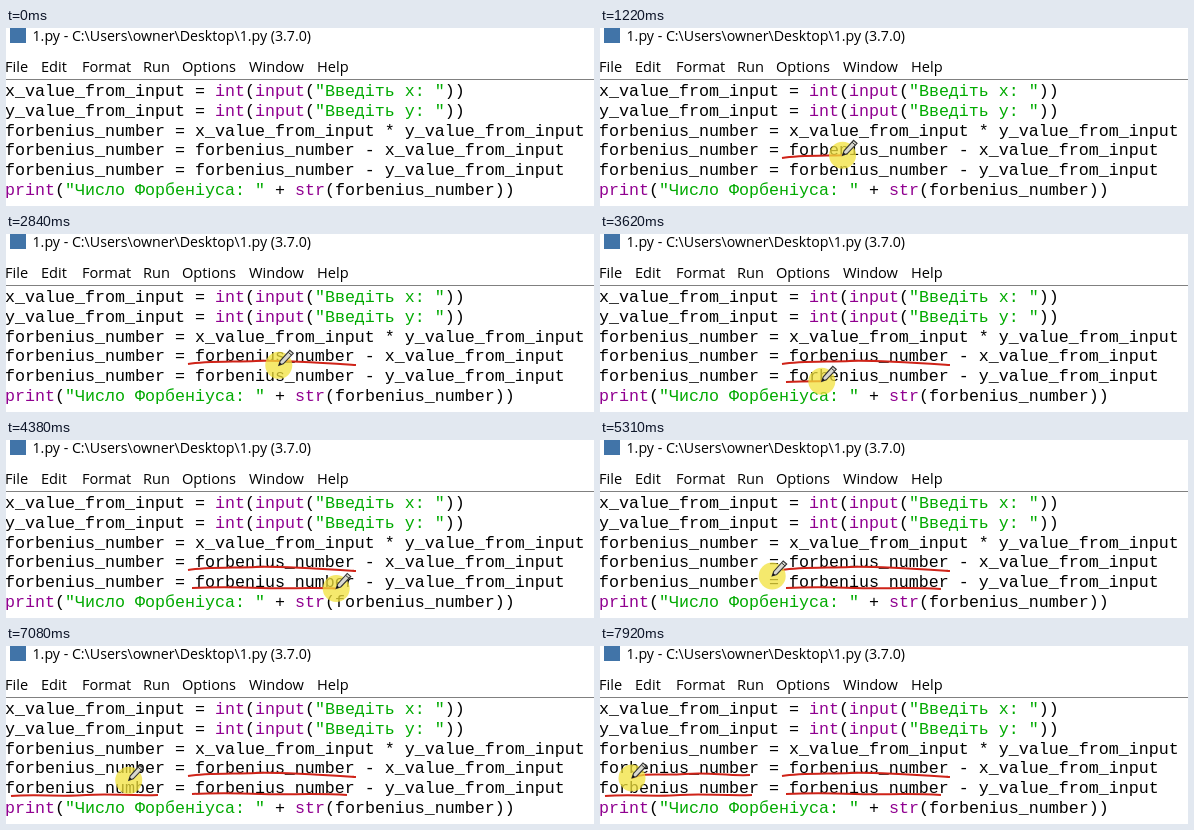
Animation of 588 by 178 pixels, one loop 8000 ms. Source, as an HTML page:

```html
<!DOCTYPE html>
<html lang="uk">
<head>
<meta charset="utf-8">
<style>
  html, body { margin: 0; width: 588px; height: 178px; overflow: hidden; background: #fff; }
  svg { display: block; }
  text { white-space: pre; }
  .ui { font: 14.6px "Open Sans", "Noto Sans", sans-serif; }
  .title { font-size: 14.2px; }
  .code { font: 16.667px "Liberation Mono", "Courier New", monospace; }
  .b { fill: #900090; }
  .s { fill: #00aa00; }
  .ink { fill: none; stroke: #cf2318; stroke-width: 2; }
  .spot { fill: #f2e23c; opacity: .75; }
</style>
</head>
<body>
<svg id="stage" width="588" height="178" viewBox="0 0 588 178">
  <rect width="588" height="178" fill="#fff"/>
  <rect x="4" y="0" width="16" height="15" fill="#4174a8"/>
  <text class="ui title" x="26.5" y="13">1.py - C:\Users\owner\Desktop\1.py (3.7.0)</text>
  <g id="menu" class="ui"></g>
  <rect y="51" width="588" height="1" fill="#808080"/>
  <g id="code" class="code"></g>
  <g id="strokes"></g>
  <g id="pen">
    <circle class="spot" r="13.5"/>
    <path d="M0 0L1.5-4.5L11-15L14.5-12L4.5-1.5Z" fill="#d8d8d0" stroke="#333" stroke-width="1.1"/>
    <path d="M0 0L1-3L3-1Z" fill="#111"/>
    <path d="M9.5-13L13-10" stroke="#333"/>
  </g>
</svg>
<script>
const $ = id => document.getElementById(id);
const LOOP = 8000;

const menu = { File: -1, Edit: 35, Format: 76, Run: 137, Options: 176, Window: 243, Help: 311 };
$("menu").innerHTML = Object.entries(menu)
  .map(([label, x]) => `<text x="${x}" y="44">${label}</text>`).join("");

const lines = [
  'x_value_from_input = int(input("Введіть x: "))',
  'y_value_from_input = int(input("Введіть y: "))',
  'forbenius_number = x_value_from_input * y_value_from_input',
  'forbenius_number = forbenius_number - x_value_from_input',
  'forbenius_number = forbenius_number - y_value_from_input',
  'print("Число Форбеніуса: " + str(forbenius_number))'
];
const paint = line => line.replace(/"[^"]*"|\b(?:int|input|print|str)\b/g,
  m => `<tspan class='${m[0] === '"' ? "s" : "b"}'>${m}</tspan>`);
$("code").innerHTML = lines
  .map((line, i) => `<text x="-1" y="${68 + i * 19.8}">${paint(line)}</text>`).join("");

// Each leg: path, whether it leaves ink, and [time, progress] keys.
const legs = [
  ["M383 150Q290 136 182 130", 0, [[70, 0], [840, .94], [930, 1]]],
  ["M182 130C200 127 228 128 250 127S318 129 350 131", 1,
    [[930, 0], [1220, .36], [1680, .61], [2070, .95], [2250, 1]]],
  ["M351 131Q280 130 201 134", 0, [[2450, 0], [3200, 1]]],
  ["M186 148C205 147 230 147 255 148S310 147 341 149", 1,
    [[3370, 0], [3480, 0], [3620, .23], [4380, .93], [4540, 1]]],
  ["M341 136L107 136", 0, [[4770, 0], [5520, 1]]],
  ["M152 149C120 150 104 147 80 149S30 148 5 150", 1, [[5610, 0], [6000, .53], [6390, 1]]],
  ["M5 150Q70 146 149 129", 0, [[6420, 0], [7230, 1]]],
  ["M150 129C125 130 110 126 85 128S45 126 32 132", 1, [[7270, 0], [7920, 1]]]
].map(([d, ink, keys]) => {
  const path = document.createElementNS("http://www.w3.org/2000/svg", "path");
  path.setAttribute("d", d);
  path.setAttribute("class", "ink");
  $("strokes").append(path);
  return { path, ink, keys, start: keys[0][0], length: path.getTotalLength() };
});

// The pen is out of sight in these spans.
const hidden = [[0, 70], [3220, 3370], [4620, 4770], [5540, 5610]];

function progress(keys, t) {
  if (t <= keys[0][0]) return 0;
  for (let i = 1; i < keys.length; i++) {
    const [t0, p0] = keys[i - 1], [t1, p1] = keys[i];
    if (t < t1) return p0 + (p1 - p0) * (t - t0) / (t1 - t0);
  }
  return 1;
}

function draw(now) {
  const t = now % LOOP;
  let tip = { x: 383, y: 150 };
  for (const { path, ink, keys, start, length } of legs) {
    const done = progress(keys, t) * length;
    path.style.display = ink && done > 0 ? "" : "none";
    path.style.strokeDasharray = `${done} ${length + 9}`;
    if (t >= start) tip = path.getPointAtLength(done);
  }
  $("pen").setAttribute("transform", `translate(${tip.x} ${tip.y})`);
  $("pen").style.display = hidden.some(([a, b]) => t >= a && t < b) ? "none" : "";
}

const begin = performance.now();
(function tick() {
  draw(performance.now() - begin);
  requestAnimationFrame(tick);
})();
</script>
</body>
</html>
```
